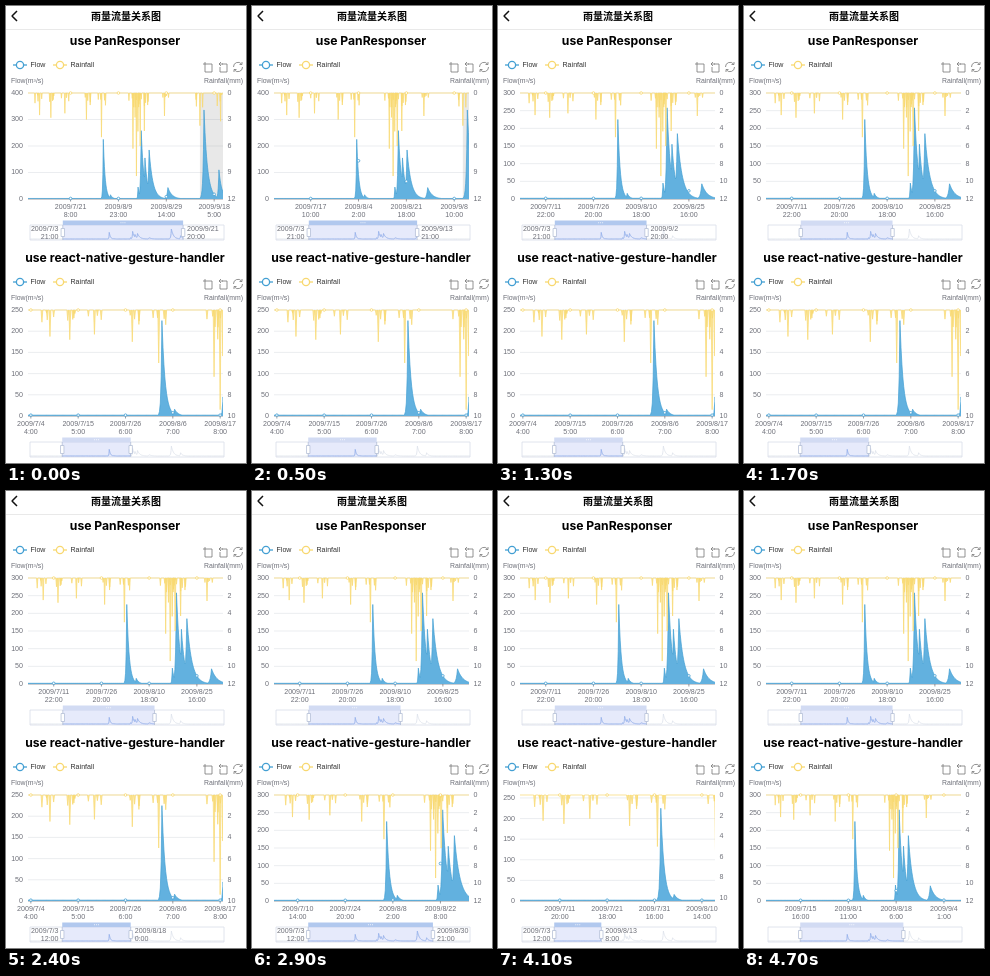
Recreate the animation shown at these times as an HTML page with a canvas. Size 240 by 457 pixels, loop 4.8 s.

```html
<!DOCTYPE html>
<html lang="en">
<head>
<meta charset="utf-8">
<style>
html, body { margin: 0; width: 100%; height: 100%; overflow: hidden; background: #fff; }
canvas { position: absolute; left: 0; top: 0; width: 240px; height: 457px; }
h1, h2 { position: absolute; left: 0; width: 238px; margin: 0; text-align: center; white-space: nowrap; color: #000; }
h1 { top: 3px; width: 240px; font: 700 10px/14px "Noto Sans CJK SC", "Noto Sans CJK", sans-serif; }
h2 { font: 700 12.15px/16px Inter, sans-serif; }
</style>
</head>
<body>
<canvas></canvas>
<h1>雨量流量关系图</h1>
<h2 style="top:27px">use PanResponser</h2>
<h2 style="top:244px">use react-native-gesture-handler</h2>
<script>
const LOOP = 4800, LEFT = 22, WIDTH = 195, TOP = 87, HEIGHT = 106, BASE = TOP + HEIGHT;
const LAST_HOUR = 3090;
const BLUE = '#439fd3', YELLOW = '#f8d870', GREY = '#6e7079';
const canvas = document.querySelector('canvas'), c = canvas.getContext('2d');
const ratio = window.devicePixelRatio || 1;
canvas.width = 240 * ratio;
canvas.height = 457 * ratio;

let seed = 7;
const random = () => (seed = seed * 16807 % 2147483647) / 2147483647;

// Hours are counted from 2009/6/12 2:00. A flood rises fast and decays slowly: hour, height, decay.
const floods = [[1264, 225, 18], [1335, 16, 20], [1606, 45, 14], [1637, 258, 26], [1674, 155, 26],
  [1715, 185, 36], [1900, 43, 40], [2255, 336, 34], [2402, 110, 28]];

function flowAt(h) {
  const levels = floods.map(([peak, height, decay]) =>
    height * Math.exp(h < peak ? (h - peak) / (decay * .25) : (peak - h) / decay));
  return Math.max(2, ...levels);
}

const flow = [];
for (let h = 0; h <= LAST_HOUR; h++) {
  if (h % 5 === 0 || floods.some(f => f[0] === h)) flow.push([h, flowAt(h)]);
}

// Each storm is one main burst with lighter showers around it.
const storms = [[637, 2.5], [748, 2.8], [886, 2.3], [1098, 3], [1246, 5], [1556, 6.3], [1590, 9.4],
  [1627, 6], [1668, 4.3], [1866, 2.6], [2215, 3.7], [2418, 3.2]];
const showers = storms.flatMap(([h, depth]) => {
  const list = [[h, depth]];
  for (let i = 0; i < 4; i++) list.push([h + (random() - .5) * 90, depth * random() * .5]);
  return list;
});
const rain = showers.sort((a, b) => a[0] - b[0])
  .flatMap(([h, v]) => [[h - 5, 0], [h, v], [h + 5, 0]]);

// The slider end follows span over time; the plot trails it by lag.
const charts = [
  { y: 0, start: 523, drag: [0, 1400], lag: 0,
    span: [[0, 1919], [900, 1575], [1300, 1463]] },
  { y: 217, start: 514, drag: [2300, 4650], lag: 350,
    span: [[2400, 1092], [2850, 2020], [3050, 1896], [3400, 1391], [3750, 980], [4100, 751], [4300, 1645]] }
];

function spanAt({ span }, t) {
  const i = span.findIndex(k => k[0] > t);
  if (i === 0) return span[0][1];
  if (i < 0) return span[span.length - 1][1];
  const [a, p] = span[i - 1], [b, q] = span[i];
  return p + (q - p) * (t - a) / (b - a);
}

function axisLimit(chart, t) {
  const end = chart.start + spanAt(chart, t - chart.lag);
  return end > 2240 ? 400 : end > 1634 ? 300 : 250;
}

// The axis glides to a new limit over 140 ms.
function easedLimit(chart, t, pick) {
  let sum = 0;
  for (let i = 0; i < 14; i++) sum += pick(axisLimit(chart, t - i * 10));
  return sum / 14;
}

function stamp(h) {
  const d = new Date(Date.UTC(2009, 5, 12, 2) + Math.round(h) * 36e5);
  return [`2009/${d.getUTCMonth() + 1}/${d.getUTCDate()}`, `${d.getUTCHours()}:00`];
}

function text(s, x, y, align = 'left', color = GREY, size = 7.1) {
  c.font = `${size}px "Liberation Sans", Arial, sans-serif`;
  c.textAlign = align;
  c.textBaseline = 'middle';
  c.fillStyle = color;
  c.fillText(s, x, y);
}

function stroke(points, color, width = 1) {
  c.beginPath();
  points.forEach(([x, y]) => c.lineTo(x, y));
  c.strokeStyle = color;
  c.lineWidth = width;
  c.lineJoin = 'bevel';
  c.stroke();
}

function dot(x, y, r, color, width = 1) {
  c.beginPath();
  c.arc(x, y, r, 0, 7);
  c.fillStyle = '#fff';
  c.fill();
  c.strokeStyle = color;
  c.lineWidth = width;
  c.stroke();
}

function area(points, base, fill, line) {
  c.beginPath();
  c.moveTo(points[0][0], base);
  points.forEach(([x, y]) => c.lineTo(x, y));
  c.lineTo(points[points.length - 1][0], base);
  c.fillStyle = fill;
  c.fill();
  stroke(points, line, .7);
}

function icon(path, x) {
  c.save();
  c.translate(x, 61);
  c.strokeStyle = '#777';
  c.lineWidth = .8;
  c.stroke(new Path2D(path));
  c.restore();
}

function drawTop() {
  [['Flow', 14, BLUE], ['Rainfall', 54, YELLOW]].forEach(([name, x, color]) => {
    stroke([[x - 7, 59], [x + 7, 59]], color, 1.3);
    dot(x, 59, 3.6, color, 1.3);
    text(name, x + 10.5, 59, 'left', '#333');
  });
  icon('M-5-3H4V5H-3V-5', 202);
  icon('M-1-3H4V5H-3V0M-2-5L-4-3L-2-1M-4-3H0', 217);
  icon('M-4.5 0A4.5 4.5 0 0 1 3.5-3M4-5V-2.5H1.5M4.5 0A4.5 4.5 0 0 1-3.5 3M-4 5V2.5H-1.5', 232);
  text('Flow(m³/s)', 5, 75, 'left', GREY, 6.9);
  text('Rainfall(mm)', 237, 75, 'right', GREY, 6.9);
}

function drawPlot(chart, t) {
  const limit = axisLimit(chart, t);
  const span = spanAt(chart, t - chart.lag);
  const dataSpan = spanAt(chart, t - chart.lag - 50);
  const flowMax = easedLimit(chart, t, v => v);
  const rainMax = easedLimit(chart, t, v => v > 250 ? 12 : 10);
  const step = limit > 300 ? 100 : 50, rainStep = limit > 300 ? 3 : 2;
  const x = (h, range) => LEFT + (h - chart.start) / range * WIDTH;
  const flowY = v => BASE - v / flowMax * HEIGHT;
  const rainY = v => TOP + v / rainMax * HEIGHT;

  for (let i = 0; i * step <= limit; i++) {
    const y = flowY(i * step);
    stroke([[LEFT, y], [LEFT + WIDTH, y]], i ? '#e3e6ea' : GREY, .7);
    text(i * step, 17, y, 'right');
    text(i * rainStep, 221.5, rainY(i * rainStep));
  }

  c.save();
  c.beginPath();
  c.rect(LEFT, TOP - 1, WIDTH, HEIGHT + 2);
  c.clip();
  c.fillStyle = 'rgba(120,120,120,.17)';
  c.fillRect(x(2215, dataSpan), TOP, WIDTH, HEIGHT);
  area(flow.map(([h, v]) => [x(h, dataSpan), flowY(v)]), BASE, '#62b1df', BLUE);
  area([[0, 0], ...rain, [LAST_HOUR, 0]].map(([h, v]) => [x(h, dataSpan), rainY(v)]), TOP, '#fbe7a0', YELLOW);
  c.restore();

  const gap = Math.ceil(.2488 * span - 6.8);
  for (let h = Math.ceil(chart.start / gap) * gap; h <= chart.start + span; h += gap) {
    const px = x(h, span);
    stroke([[px, BASE], [px, BASE + 2.5]], GREY, .7);
    dot(px, flowY(flowAt(h)), 1.3, BLUE, .8);
    dot(px, TOP, 1.3, YELLOW, .8);
    stamp(h).forEach((s, i) => text(s, px, 201.5 + i * 8, 'center'));
  }
}

function drawSlider(chart, t) {
  const x = h => 24 + h * .0627;
  const a = x(chart.start), b = x(chart.start + spanAt(chart, t));
  const active = t >= chart.drag[0] && t < chart.drag[1];
  const shadow = flow.map(([h, v]) => [x(h), 233 - v / 340 * 10]);

  c.strokeStyle = '#d8dde9';
  c.lineWidth = .8;
  c.strokeRect(24, 219, 194, 15);
  stroke(shadow, '#d9dee8', .7);
  c.fillStyle = 'rgba(140,160,235,.22)';
  c.fillRect(a, 219, b - a, 15);
  c.save();
  c.beginPath();
  c.rect(a, 219, b - a, 15);
  c.clip();
  stroke(shadow, '#93b0ee', .7);
  c.restore();
  c.fillStyle = active ? '#b1c8ee' : '#d2dbf3';
  c.fillRect(a, 214.5, b - a, 4.5);
  [-2, 0, 2].forEach(d => {
    c.fillStyle = '#fff';
    c.fillRect((a + b) / 2 + d - .4, 216.3, .8, .9);
  });
  [a, b].forEach(px => {
    stroke([[px, 219], [px, 234]], '#acb8d1', .7);
    c.fillStyle = '#fff';
    c.fillRect(px - 1.7, 222.5, 3.4, 8);
    c.strokeRect(px - 1.7, 222.5, 3.4, 8);
  });
  if (!active) return;
  stamp(chart.start).forEach((s, i) => text(s, 52.5, 223 + i * 8, 'right'));
  stamp(chart.start + spanAt(chart, t - chart.lag)).forEach((s, i) => text(s, b + 4, 223 + i * 8));
}

function draw(now) {
  let t = Math.floor(now % LOOP / 100) * 100;
  if (t < 200) t = 0;
  c.setTransform(ratio, 0, 0, ratio, 0, 0);
  c.clearRect(0, 0, 240, 457);
  stroke([[11, 5], [6, 10], [11, 15]], '#111', 1.5);
  stroke([[0, 23.5], [240, 23.5]], '#e4e4e4', .8);
  for (const chart of charts) {
    c.save();
    c.translate(0, chart.y);
    drawTop();
    drawPlot(chart, t);
    drawSlider(chart, t);
    c.restore();
  }
}

const begin = performance.now();
function frame() {
  draw(performance.now() - begin);
  requestAnimationFrame(frame);
}
frame();
</script>
</body>
</html>
```
